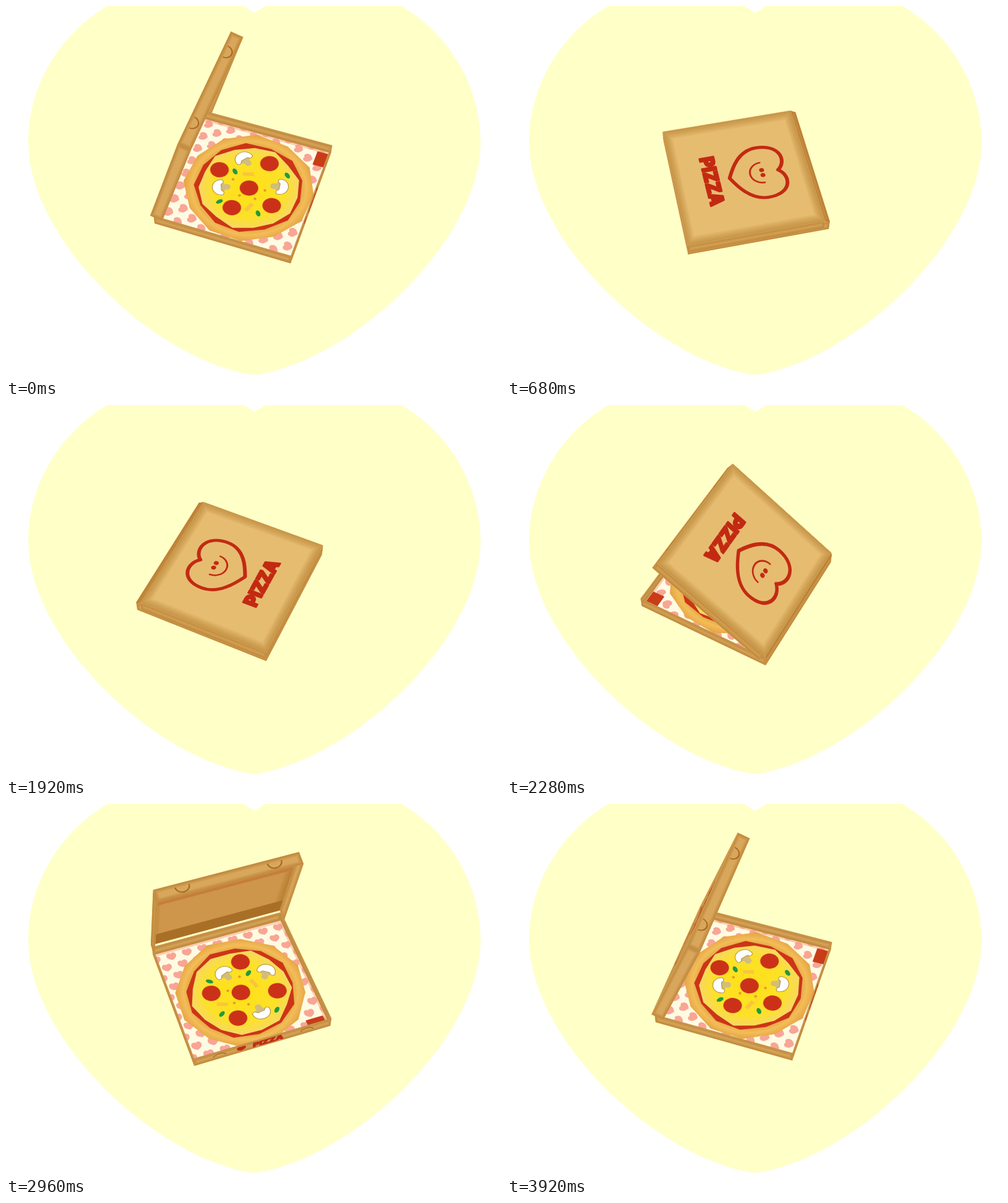
An HTML page with a canvas that plays this animation: 800 by 600 pixels, repeating every 3.96 s.

```html
<!DOCTYPE html>
<html lang="en">
<head>
<meta charset="utf-8">
<title>Pizza box</title>
<style>
  html, body { margin: 0; width: 100%; height: 100%; overflow: hidden; background: #fff; }
  canvas { display: block; width: 800px; height: 600px; }
</style>
</head>
<body>
<canvas id="stage" width="800" height="600"></canvas>
<script>
const ctx = document.getElementById('stage').getContext('2d');
const LOOP = 3960, CYCLE = 3880, STEP = 40, TAU = Math.PI * 2;
const S = 113, W = 113.5, H = 20, LEN = 218, DIST = 1700, TILT = .814, RISE = .58;
const RED = '#c32a12';

// Keys: time, value, slope per ms
const SPIN = [[0, 0, 0], [680, 211, .6], [1280, 631, .74], [1920, 1074, .6],
              [2640, 1348, .17], [3280, 1412, .07], [3880, 1440, 0]];
const LID = [[0, 75, -.06], [560, 0, 0], [1960, 0, 0], [2640, 72.5, .01], [3280, 73.5, .002], [3880, 75, 0]];

function track(keys, t) {
  let i = 0;
  while (i < keys.length - 2 && t > keys[i + 1][0]) i++;
  const [t0, a, m] = keys[i], [t1, b, n] = keys[i + 1];
  const d = t1 - t0, x = (t - t0) / d, y = 1 - x;
  return y * y * (1 + 2 * x) * a + x * x * (3 - 2 * x) * b + d * x * y * (y * m - x * n);
}

// Pose of the current moment
let cos, sin, shift, open, lidCos, lidSin;

function pose(t) {
  const yaw = (track(SPIN, t) - 19) * TAU / 360;
  const angle = track(LID, t), lift = angle * TAU / 360;
  open = angle / 75;
  cos = Math.cos(yaw); sin = Math.sin(yaw);
  lidCos = Math.cos(lift); lidSin = Math.sin(lift);
  shift = -10 + 24 * open;
}

// Box space (front, side, height) to screen
function box(a, b, h) {
  a += shift;
  const x = a * cos - b * sin, y = a * sin + b * cos;
  const k = DIST / (DIST + RISE * y - TILT * h);
  return [373 + x * k, 278 - (TILT * y + RISE * h) * k];
}

// Lid space (from hinge, side, depth under the top), turned about a low pivot
function lid(r, b, n) {
  const x = r + 3, y = 12 - n;
  return box(5 - S + x * lidCos - y * lidSin, b, x * lidSin + y * lidCos - 6);
}

function trace(pts) {
  ctx.beginPath();
  pts.forEach(p => ctx.lineTo(p[0], p[1]));
  ctx.closePath();
}

const area = pts => pts.reduce((sum, p, i) => {
  const q = pts[(i + 1) % pts.length];
  return sum + p[0] * q[1] - q[0] * p[1];
}, 0);

function face(pts, fill, glow = 10, shade = 'rgba(160,98,22,.1)') {
  ctx.save();
  trace(pts);
  ctx.fillStyle = ctx.strokeStyle = fill;
  ctx.lineWidth = .8;
  ctx.fill();
  ctx.stroke();
  ctx.clip();
  ctx.strokeStyle = shade;
  for (let i = 1; i <= 5; i++) {
    ctx.lineWidth = glow * i / 2.5;
    ctx.stroke();
  }
  ctx.restore();
}

// Draw flat art on a plane given by a mapping
function on(map, x, y, draw) {
  const o = map(x, y), p = map(x + 8, y), q = map(x, y + 8);
  ctx.save();
  ctx.transform((p[0] - o[0]) / 8, (p[1] - o[1]) / 8, (q[0] - o[0]) / 8, (q[1] - o[1]) / 8, o[0], o[1]);
  draw();
  ctx.restore();
}

function disc(x, y, rx, ry = rx, turn = 0) {
  ctx.beginPath();
  ctx.ellipse(x, y, rx, ry, turn, 0, TAU);
  ctx.fill();
}

function heart() {
  ctx.beginPath();
  ctx.moveTo(0, -34);
  ctx.bezierCurveTo(-14, -52, -50, -48, -50, -8);
  ctx.bezierCurveTo(-50, 22, -17, 38, 0, 46);
  ctx.bezierCurveTo(17, 38, 50, 22, 50, -8);
  ctx.bezierCurveTo(50, -48, 14, -52, 0, -34);
  ctx.closePath();
}

function word(size, x, y) {
  ctx.font = `900 ${size}px Inter, sans-serif`;
  ctx.textAlign = 'center';
  ctx.textBaseline = 'alphabetic';
  ctx.fillStyle = ctx.strokeStyle = RED;
  ctx.lineJoin = 'round';
  ctx.lineWidth = size / 10;
  ctx.fillText('PIZZA', x, y);
  ctx.strokeText('PIZZA', x, y);
}

function tabs(y, from, to) {
  ctx.strokeStyle = '#a86a25';
  ctx.lineWidth = 2;
  for (const x of [-72, 72]) {
    ctx.beginPath();
    ctx.ellipse(x, y, 11, 10, 0, from, to);
    ctx.stroke();
  }
}

function backdrop() {
  ctx.fillStyle = '#fff';
  ctx.fillRect(0, 0, 800, 600);
  ctx.fillStyle = '#ffffc8';
  ctx.beginPath();
  ctx.moveTo(401.5, 11);
  ctx.bezierCurveTo(365, -12, 330, -32, 280, -32);
  ctx.bezierCurveTo(148, -32, 36, 86, 36, 220);
  ctx.bezierCurveTo(36, 374, 231, 565, 392, 595.5);
  ctx.quadraticCurveTo(401.5, 597, 411, 595.5);
  ctx.bezierCurveTo(572, 565, 767, 374, 767, 220);
  ctx.bezierCurveTo(767, 86, 655, -32, 523, -32);
  ctx.bezierCurveTo(473, -32, 438, -12, 401.5, 11);
  ctx.fill();
}

function ring(n, radius, wobble, turn) {
  ctx.beginPath();
  for (let i = 0; i < n; i++) {
    const r = radius + wobble * Math.sin(i * 2.4), a = i * TAU / n + turn;
    ctx.lineTo(r * Math.cos(a), r * Math.sin(a));
  }
  ctx.closePath();
}

function mushroom(x, y, turn) {
  ctx.save();
  ctx.translate(x, y);
  ctx.rotate(turn);
  ctx.fillStyle = '#d2bd7c';
  ctx.strokeStyle = '#b99a4e';
  ctx.lineWidth = 1.3;
  ctx.beginPath();
  ctx.roundRect(0, -5, 17, 11, 5);
  ctx.ellipse(4, 0, 5, 9, 0, 0, TAU);
  ctx.fill();
  ctx.fillStyle = '#fff';
  ctx.beginPath();
  ctx.moveTo(4, -15);
  ctx.bezierCurveTo(-18, -17, -18, 17, 4, 15);
  ctx.quadraticCurveTo(9, 10, 2, 6);
  ctx.lineTo(2, -6);
  ctx.quadraticCurveTo(9, -10, 4, -15);
  ctx.fill();
  ctx.stroke();
  ctx.restore();
}

function pizza() {
  const crust = ctx.createRadialGradient(0, 0, 80, 0, 0, 106);
  crust.addColorStop(0, '#dfa03e');
  crust.addColorStop(.5, '#f3bd58');
  crust.addColorStop(1, '#e5a544');
  ctx.fillStyle = crust;
  ring(12, 106, 1.5, .2);
  ctx.fill();

  ctx.fillStyle = '#cc3517';
  ring(13, 88, 2, .5);
  ctx.fill();

  const cheese = ctx.createRadialGradient(0, 0, 10, 0, 0, 84);
  cheese.addColorStop(0, '#ffe01a');
  cheese.addColorStop(.65, '#fde128');
  cheese.addColorStop(1, '#f6d768');
  ctx.fillStyle = cheese;
  ring(15, 81, 3, .1);
  ctx.fill();

  ctx.fillStyle = '#f8c63c';
  for (const [x, y, turn] of [[12, -36, 1.2], [-10, 26, .3]]) {
    ctx.save();
    ctx.translate(x, y);
    ctx.rotate(turn);
    ctx.fillRect(-9, -3.5, 18, 7);
    ctx.restore();
  }
  ctx.fillStyle = '#e49a2c';
  for (const [x, y] of [[-30, 8], [16, -17], [-10, -19], [26, 4]]) disc(x, y, 2.4);

  for (const [x, y] of [[0, 0], [-14, -46], [-57, 19], [46, -21], [16, 57]]) {
    ctx.fillStyle = '#e8931f';
    disc(x, y, 15.5);
    ctx.fillStyle = '#cb3119';
    disc(x, y, 14.8);
  }
  mushroom(-45, -14, .38);
  mushroom(-27, 53, -.61);
  mushroom(48, 19, 3.28);
  ctx.fillStyle = '#219a42';
  for (const [x, y, turn] of [[-37, -41, .9], [-32, 24, 2.3], [30, -43, 2.2], [51, 44, 2.4]]) disc(x, y, 6.2, 3.6, turn);
}

function tray() {
  const rim = [[S, -S], [S, S], [-S, S], [-S, -S]];
  const floor = rim.map(([a, b]) => box(a, b, -H));
  ctx.save();
  trace(floor);
  ctx.fillStyle = '#fffbe2';
  ctx.fill();
  ctx.clip();
  ctx.fillStyle = '#f9a596';
  for (let row = 0; row < 11; row++) {
    for (let col = 0; col < 9; col++) {
      const a = row * 20 - 100, b = col * 27 - 112 + row % 2 * 13.5;
      on((x, y) => box(y, x, -H), b, a, () => {
        ctx.scale(.165, .165);
        heart();
        ctx.fill();
      });
    }
  }
  ctx.strokeStyle = 'rgba(248,160,130,.5)';
  ctx.lineWidth = 7;
  trace(floor);
  ctx.stroke();
  ctx.restore();
  trace([box(91, 80, -H), box(91, 109, -H), box(112, 109, -H), box(112, 80, -H)]);
  ctx.fillStyle = '#c93c18';
  ctx.fill();

  const walls = rim.map(([a, b], i) => {
    const [c, d] = rim[(i + 1) % 4];
    return [box(a, b, 0), box(c, d, 0), box(c, d, -H), box(a, b, -H)];
  });
  const near = walls.map(w => area(w) > 0);
  walls.forEach((w, i) => near[i] || face(w, '#d5a258', 5));
  on((x, y) => box(7 + x, y, -H + 1), 0, 0, pizza);
  walls.forEach((w, i) => near[i] && face(w, '#d8a65b', 5));

  if (near[0] && open > .05) {
    on((x, y) => box(S, x, -y), 0, 0, () => {
      tabs(16, Math.PI * 1.1, Math.PI * 1.9);
      word(16, 8, 16);
      ctx.translate(-36, 10);
      ctx.scale(.15, .13);
      ctx.fillStyle = RED;
      heart();
      ctx.fill();
    });
  }
  trace(rim.map(([a, b]) => box(a, b, 0)));
  ctx.strokeStyle = '#c8954c';
  ctx.lineWidth = 2;
  ctx.lineJoin = 'round';
  ctx.stroke();
}

function emblem() {
  const top = (x, y) => lid(y, x, 0);
  on(top, 2, 83, () => {
    ctx.strokeStyle = ctx.fillStyle = RED;
    ctx.lineCap = ctx.lineJoin = 'round';
    ctx.lineWidth = 6;
    heart();
    ctx.stroke();
    ctx.lineWidth = 3;
    ctx.beginPath();
    ctx.arc(0, -8, 20, 0, Math.PI);
    ctx.stroke();
    disc(-5, -8, 4);
    disc(5, -8, 4);
  });
  on(top, 2, 158, () => word(31, 0, 11));
}

function cover() {
  const wall = (r, b, q, c) => [lid(r, b, 0), lid(q, c, 0), lid(q, c, H), lid(r, b, H)];
  const panel = (from, to) => [lid(from, -W, 0), lid(from, W, 0), lid(to, W, 0), lid(to, -W, 0)];
  const top = panel(0, LEN);
  const lip = wall(LEN, -W, LEN, W);
  const sides = [lip, wall(LEN, W, 0, W), wall(0, -W, LEN, -W)];

  if (open < .9) face([box(-S, -S, 0), box(-S, S, 0), top[1], top[0]], '#cb9046', 3);

  if (area(top) < 0) {
    face(top, '#cd964a', 12);
    const band = (from, to, fill) => {
      trace(panel(from, to));
      ctx.fillStyle = fill;
      ctx.fill();
    };
    band(0, 42, '#a96f27');
    band(LEN * .72, LEN, '#c67e3b');
  }
  sides.forEach(w => area(w) <= 0 && face(w, '#ddab62', 6));
  sides.forEach(w => area(w) > 0 && face(w, '#d9a75c', 6));
  if (area(top) >= 0) {
    face(top, '#e6bc71', 13);
    emblem();
  }
  if (area(lip) > 0 && open > .15) on((x, y) => lid(LEN, x, y), 0, 0, () => tabs(5, 0, Math.PI));
}

function frame(now) {
  const t = Math.floor(now % LOOP / STEP) * STEP;
  pose(t % CYCLE);
  backdrop();
  tray();
  cover();
  requestAnimationFrame(frame);
}
frame(0);
</script>
</body>
</html>
```
